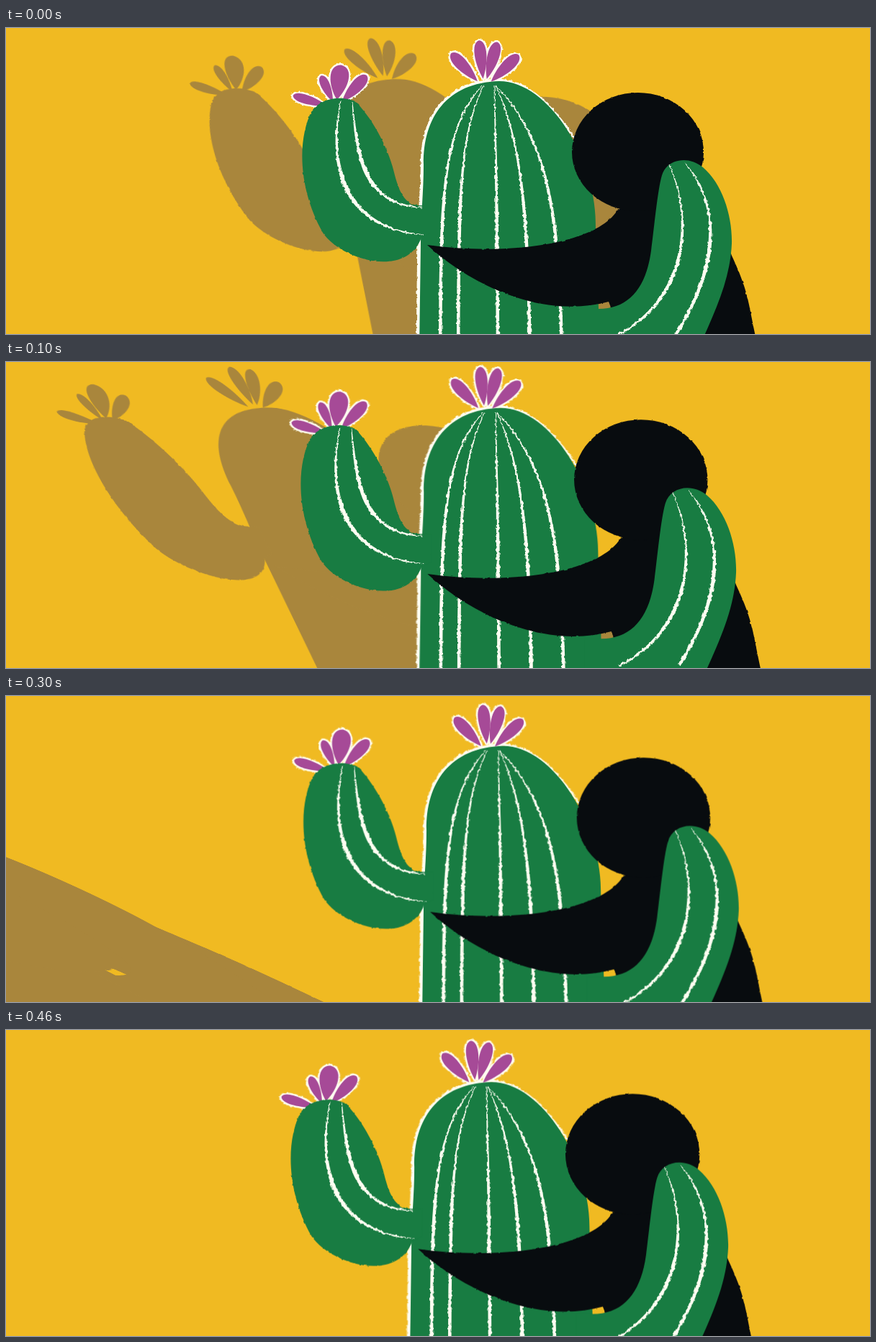
Animation, 1200 px wide and 426 px high, one loop 500 ms. Source, as an HTML page:

```html
<!DOCTYPE html>
<html lang="en">
<head>
<meta charset="utf-8">
<title>Cactus hug</title>
<style>
  html, body { margin: 0; width: 100%; height: 100%; overflow: hidden; background: #f0ba22; }
  svg { display: block; width: 100%; height: 100%; }
  .green { fill: #187c42; }
  .black { fill: #080c0f; }
  .purple { fill: #a64a97; }
  .white { fill: #fffef2; }
  .halo { fill: #fffef2; stroke: #fffef2; stroke-width: 5; stroke-linejoin: round; }
  .shadow * { fill: #a9863c; }
</style>
</head>
<body>
<svg id="stage" viewBox="0 0 1200 426">
  <defs>
    <filter id="chalk" color-interpolation-filters="sRGB">
      <feTurbulence type="fractalNoise" baseFrequency=".22" numOctaves="2" seed="4"/>
      <feDisplacementMap in="SourceGraphic" scale="4" xChannelSelector="R" yChannelSelector="G"/>
    </filter>
    <filter id="brush" color-interpolation-filters="sRGB">
      <feTurbulence type="fractalNoise" baseFrequency=".15" numOctaves="2" seed="9"/>
      <feDisplacementMap in="SourceGraphic" scale="2.5" xChannelSelector="R" yChannelSelector="G"/>
    </filter>
  </defs>
</svg>
<script>
const stage = document.getElementById('stage');
const STEP = 100;

const TRUNK = `M574 450 L576 300 C576 260 580 230 580 190 C579 125 612 76 685 74
  C755 74 822 185 819 280 L823 391 V450Z`;
const LEFT_ARM = `M590 247 H575 C552 247 545 223 540 205 C533 172 512 130 487 104
  C472 94 440 95 425 115 C404 155 406 225 440 285 C465 322 555 350 577 292 L590 285Z`;
const RIGHT_ARM = `M800 391 H823 C865 391 889 362 896 310 C900 280 905 225 911 205
  C918 182 948 177 968 194 C995 217 1009 262 1008 300 C1006 350 985 395 960 450 H800Z`;
const PERSON = `M849 254 C820 300 700 318 585 302 C650 362 750 405 837 381 L842 394 L900 450
  H1046 C1030 385 1035 375 1008 317 L960 185Z`;
const TRUNK_EDGE = `M574 450 L575 300 C575 260 579 230 579 190 C578 125 611 75 685 73
  C730 74 765 118 792 157`;

// Petals fan out from a centre: angle from upright, length, width.
const flowers = [
  { x: 458, y: 112, petals: [[-73, 62, 13], [-24, 50, 13], [7, 61, 26], [43, 63, 17]] },
  { x: 664, y: 84, petals: [-43, -6, 16, 46].map(angle => [angle, 67, 17]) }
];

function add(parent, tag, attrs = {}) {
  const el = document.createElementNS('http://www.w3.org/2000/svg', tag);
  for (const key in attrs) el.setAttribute(key, attrs[key]);
  return parent.appendChild(el);
}
const group = (parent, filter) => add(parent, 'g', filter ? { filter: `url(#${filter})` } : {});
const shape = (parent, cls, d) => add(parent, 'path', { class: cls, d });

function bloom(parent, cls) {
  for (const { x, y, petals } of flowers)
    for (const [angle, len, w] of petals) {
      const side = s => [s * w * .55, -len * .5, s * w * .75, -len * .96];
      const [a, b, c, d] = side(1), [e, f, g, h] = side(-1);
      const path = shape(parent, cls,
        `M0 ${-len * .2}C${a} ${b} ${c} ${d} 0 ${-len}C${g} ${h} ${e} ${f} 0 ${-len * .2}Z`);
      path.setAttribute('transform', `translate(${x} ${y}) rotate(${angle})`);
    }
}

function drawCactus(parent) {
  shape(parent, 'green', TRUNK);
  shape(group(parent, 'brush'), 'green', LEFT_ARM);
}
function drawPerson(parent) {
  const g = group(parent, 'brush');
  shape(g, 'black', PERSON);
  add(g, 'ellipse', { class: 'black', cx: 877.5, cy: 172.5, rx: 91.5, ry: 82.5 });
}

// Chalk line whose width runs from start over middle to end.
function rib(parent, d, start, mid, end) {
  const path = shape(parent, 'white', d);
  const len = path.getTotalLength(), n = Math.ceil(len / 6);
  const left = [], right = [];
  for (let i = 0; i <= n; i++) {
    const u = i / n, s = u * len;
    const p = path.getPointAtLength(s);
    const a = path.getPointAtLength(Math.max(0, s - 1));
    const b = path.getPointAtLength(Math.min(len, s + 1));
    const m = Math.hypot(b.x - a.x, b.y - a.y) || 1;
    const w = u < .5 ? start + (mid - start) * u * 2 : mid + (end - mid) * (u * 2 - 1);
    const nx = -(b.y - a.y) / m * w / 2, ny = (b.x - a.x) / m * w / 2;
    left.push([p.x + nx, p.y + ny]);
    right.unshift([p.x - nx, p.y - ny]);
  }
  path.setAttribute('d', 'M' + left.concat(right).join('L') + 'Z');
}

// Trunk line that leaves the crown and settles to an upright.
function trunkRib(parent, top, foot, fall) {
  const points = [];
  for (let y = 80; y <= 450; y += 10)
    points.push([foot + (top - foot) * Math.exp((80 - y) / fall), y]);
  rib(parent, 'M' + points.join('L'), 1, 4.5, 4.5);
}

// The shadow is the couple's own outline, sheared.
const shadow = group(stage);
shadow.setAttribute('class', 'shadow');
bloom(shadow, 'purple');
drawCactus(shadow);
drawPerson(shadow);
shape(shadow, 'green', RIGHT_ARM);

const hug = group(stage);
const chalk = group(hug, 'chalk');
bloom(chalk, 'halo');
rib(chalk, TRUNK_EDGE, 9, 6, 3);
bloom(hug, 'purple');
drawCactus(hug);

const lines = group(hug, 'chalk');
trunkRib(lines, 661, 603, 66);
trunkRib(lines, 664, 628, 68);
trunkRib(lines, 678, 684, 200);
trunkRib(lines, 680, 729, 105);
trunkRib(lines, 680, 774, 97);
rib(lines, 'M465 101 C445 200 475 280 580 288', 1, 6, 1);
rib(lines, 'M481 103 C488 195 505 246 578 250', 1, 6, 1);

drawPerson(hug);
shape(hug, 'green', RIGHT_ARM);
const armLines = group(hug, 'chalk');
rib(armLines, 'M921 190 C958 275 942 380 848 428', .8, 5, 2.5);
rib(armLines, 'M943 188 C992 245 992 330 930 427', .8, 5, 4);

// Couple at each step: shift x, shift y, zoom.
const poses = [
  [0, 0, 1],
  [-7.5, -11, 1.0134],
  [-6, -5.2, 1.0134],
  [-3.8, -5.5, 1.0134],
  [-23.5, -2.8, 1.0184]
];
// Shadow at each step: stretch, lean, shift x, shift y.
const leans = [
  [1.035, .21, -177, -34],
  [1.075, .49, -404, -41.5],
  [1.062, 1.023, -789, -36],
  [1.1, 1.897, -1495, -35],
  [1.1, 2.6, -2300, -35]
];

function play(el, transforms) {
  const count = transforms.length;
  const keys = transforms.map((transform, i) =>
    ({ transform, offset: i / count, easing: 'step-end' }));
  keys.push({ transform: transforms[count - 1], offset: 1 });
  el.animate(keys, { duration: count * STEP, iterations: Infinity });
}
play(hug, poses.map(([x, y, zoom]) => `translate(${x}px, ${y}px) scale(${zoom})`));
play(shadow, leans.map(([stretch, lean, x, y]) =>
  `matrix(${stretch}, .047, ${lean}, .985, ${x}, ${y})`));
</script>
</body>
</html>
```
